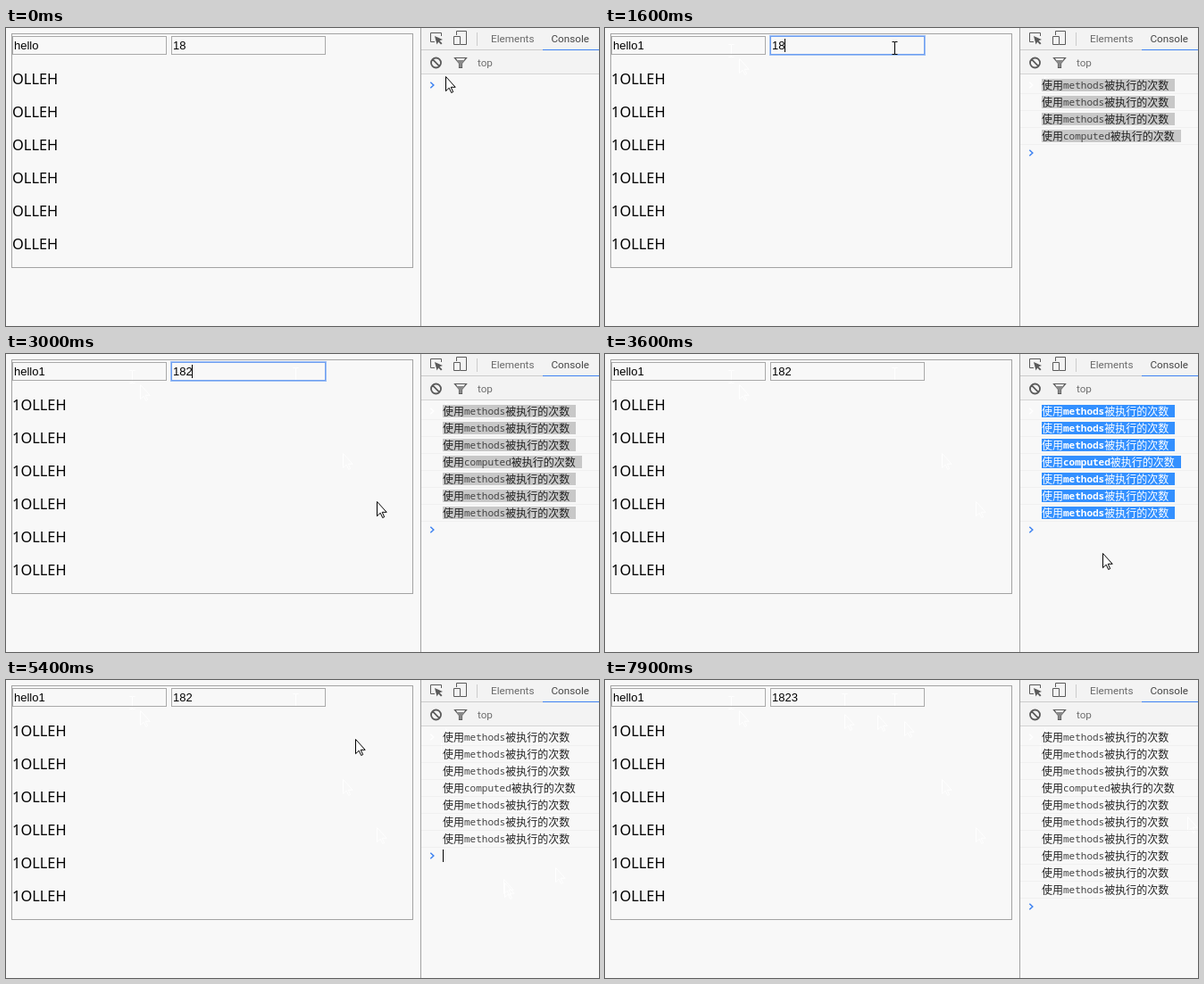
An HTML page with a canvas that plays this animation: 664x334 px, repeating every 8 s.

```html
<!DOCTYPE html>
<html lang="en">
<head>
<meta charset="utf-8">
<title>Methods and computed</title>
<style>
  html, body { margin: 0; width: 100%; height: 100%; overflow: hidden; background: #f8f8f8; }
  canvas { display: block; }
</style>
</head>
<body>
<canvas id="stage" width="664" height="334"></canvas>
<script>
const ctx = document.getElementById('stage').getContext('2d');
const LOOP = 8000, STEP = 100, BLINK = 500, LONGEST_MOVE = 900, POINTER_GONE = 6800;
const ROW = 19, FIRST_ROW = 64;
const ARIAL = '13px "Liberation Sans", Arial, sans-serif';
const PARAGRAPH = '16.4px "Noto Sans", "Open Sans", sans-serif';
const PANEL = '11.7px Roboto, sans-serif';
const CJK = '12px "Noto Sans CJK SC", "Noto Sans CJK", sans-serif';
const MONO = '11px "Noto Sans Mono", monospace';

// Each event changes part of the state and restarts the caret blink
const EVENTS = [
  { at: 0, first: 'hello', second: '18', logs: 0, selection: 'passive' },
  { at: 500, focus: 'first' },
  { at: 800, first: 'hello1', logs: 4 },
  { at: 1600, focus: 'second' },
  { at: 2800, second: '182', logs: 7 },
  { at: 3600, focus: 'console', selection: 'active' },
  { at: 3700, selection: 'none' },
  { at: 4300, focus: 'prompt' },
  { at: 5700, focus: 'second' },
  { at: 6100, second: '1823', logs: 10 },
  { at: 7900, focus: 'none' }
];

// Pointer stops: arrival time, x, y
const STOPS = [
  [0, 492, 54], [500, 141, 25], [700, 150, 34], [1300, 324, 22],
  [2700, 377, 111], [3000, 415, 165], [3600, 557, 223], [3900, 558, 227],
  [4100, 615, 210], [4800, 487, 70], [5100, 576, 133], [5600, 268, 22],
  [5900, 268, 38], [6100, 305, 39], [6200, 335, 46], [6700, 652, 153]
];

function rect(x, y, w, h, color) {
  ctx.fillStyle = color;
  ctx.fillRect(x, y, w, h);
}

function frame(x, y, w, h, color) {
  ctx.strokeStyle = color;
  ctx.lineWidth = 1;
  ctx.strokeRect(x + .5, y + .5, w - 1, h - 1);
}

// Draws text and returns the x where it ends
function text(str, x, y, font, color) {
  ctx.font = font;
  ctx.fillStyle = color;
  ctx.fillText(str, x, y);
  return x + ctx.measureText(str).width;
}

function fill(d, color) {
  ctx.fillStyle = color;
  ctx.fill(new Path2D(d));
}

function stroke(d, color, width) {
  ctx.strokeStyle = color;
  ctx.lineWidth = width;
  ctx.stroke(new Path2D(d));
}

function input(x, value, focused, caretOn) {
  if (focused) frame(x - 1, 8, 175, 23, '#9dbff5');
  frame(x, 9, 173, 21, focused ? '#6f9ff0' : '#a9a9a9');
  const end = text(value, x + 2, 24, ARIAL, '#000');
  if (focused && caretOn) rect(Math.floor(end), 12, 1, 15, '#000');
}

function page({ first, second, focus }, caretOn) {
  frame(6, 6, 450, 263, '#a3a3a3');
  input(7, first, focus === 'first', caretOn);
  input(185, second, focus === 'second', caretOn);
  const reversed = [...first.toUpperCase()].reverse().join('');
  for (let i = 0; i < 6; i++) text(reversed, 7, 63 + i * 37, PARAGRAPH, '#000');
}

function toolbars() {
  rect(464, 0, 1, 334, '#a3a3a3');
  rect(465, 0, 199, 51, '#f3f3f3');
  rect(465, 24, 199, 1, '#ccc');
  rect(465, 51, 199, 1, '#d4d4d4');
  rect(527, 5, 1, 15, '#ccc');
  rect(601, 24, 63, 1, '#3e82f1');
  text('Elements', 543, 16, PANEL, '#6a6a6a');
  text('Console', 610.5, 16, PANEL, '#444');
  text('top', 528, 43, PANEL, '#6e6e6e');

  const ink = '#5a5a5a';
  stroke('M480 15.5H475.5V5.5H487.5V9', ink, 1);
  fill('M480 9L489 13L485.5 14.3L488.5 17.3L487 18.5L484.2 15.6L482.5 18.5Z', ink);
  stroke('M504.5 8V3.5H515.5V18.5H509M501.5 9.5H508.5V18.5H501.5Z', ink, 1);
  stroke('M487 39A5.5 5.5 0 1 1 476 39A5.5 5.5 0 1 1 487 39M477.7 35.2L485.3 42.8', ink, 1.8);
  stroke('M502.5 33.5H515.5L510.5 39.5V44.5H507.5V39.5Z', ink, 1.2);
  fill('M504 36H514L510.5 40V44H507.5V40Z', '#8a8a8a');
}

function chevron(y, color) {
  stroke(`M475.3 ${y - 3.2}l3.5 3.2l-3.5 3.2`, color, 1.5);
}

function consoleLog({ logs, selection, focus }, caretOn) {
  const active = selection === 'active';
  const color = active ? '#fff' : '#222';
  for (let i = 0; i < logs; i++) {
    const y = FIRST_ROW + i * ROW;
    const word = i === 3 ? 'computed' : 'methods';
    if (selection !== 'none') {
      rect(489, y - 7, 100 + 7 * word.length, 14, active ? '#3390ff' : '#c8c8c8');
    }
    rect(465, y + 9, 199, 1, '#f0f0f0');
    let x = text('使用', 489, y + 5, CJK, color);
    x = text(word, x, y + 4, (active ? 'bold ' : '') + MONO, active ? color : '#444');
    text('被执行的次数', x, y + 5, CJK, color);
  }
  const promptY = FIRST_ROW + logs * ROW;
  if (logs) chevron(FIRST_ROW, '#fff');
  chevron(promptY, '#3e82f1');
  if (focus === 'prompt' && caretOn) rect(489, promptY - 7, 1, 14, '#000');
}

// An I-beam over the inputs, an arrow elsewhere; a mark is a white outline
function pointer(x, y, mark) {
  x = Math.round(x) + .5;
  y = Math.round(y) + .5;
  const ink = mark ? '#fff' : '#000';
  if (y < 30 && x < 358) {
    stroke(`M${x - 3} ${y - 7}h2.5l.5 .5l.5-.5h2.5M${x} ${y - 7}v14` +
      `M${x - 3} ${y + 7}h2.5l.5-.5l.5 .5h2.5`, ink, 1);
    return;
  }
  const arrow = `M${x} ${y}v16.2l3.7-3.5l2.5 5.3l2-.9l-2.5-5.3h5z`;
  if (!mark) fill(arrow, '#fff');
  stroke(arrow, ink, 1);
}

function pointerAt(t) {
  const next = STOPS.findIndex(([arrival]) => arrival > t);
  if (next < 0) return STOPS.at(-1).slice(1);
  const [t0, x0, y0] = STOPS[next - 1];
  const [t1, x1, y1] = STOPS[next];
  const duration = Math.min(t1 - t0, LONGEST_MOVE);
  const k = Math.max(0, 1 - (t1 - t) / duration);
  return [x0 + (x1 - x0) * k, y0 + (y1 - y0) * k];
}

function draw(t) {
  const past = EVENTS.filter(event => event.at <= t);
  const state = Object.assign({}, ...past);
  const caretOn = Math.floor((t - state.at) / BLINK) % 2 === 0;

  rect(0, 0, 664, 334, '#f8f8f8');
  for (const [arrival, x, y] of STOPS) if (arrival < t) pointer(x, y, true);
  page(state, caretOn);
  toolbars();
  consoleLog(state, caretOn);
  if (t < POINTER_GONE) pointer(...pointerAt(t), false);
}

const start = performance.now();
function tick() {
  const elapsed = Math.max(0, performance.now() - start) % LOOP;
  draw(Math.floor(elapsed / STEP) * STEP);
  requestAnimationFrame(tick);
}
tick();
</script>
</body>
</html>
```
